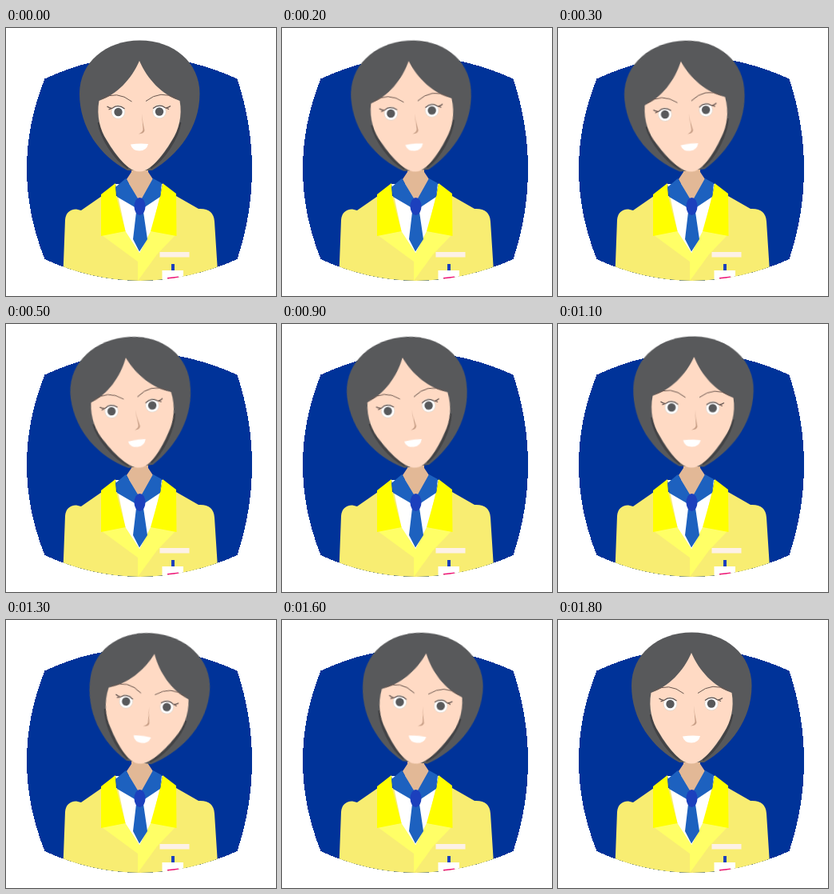
An HTML page that plays this animation: 338 px wide and 335 px high, repeating every 2.6 s.

```html
<!DOCTYPE html>
<html lang="en">
<head>
<meta charset="utf-8">
<title>Nodding assistant</title>
<style>
  html, body { margin: 0; width: 100%; height: 100%; overflow: hidden; background: #fff; }
  svg { display: block; width: 338px; height: 335px; }

  /* 26 beats of 100 ms */
  #head { transform-origin: 167px 170px; animation: tilt 2600ms step-end infinite; }
  @keyframes tilt {
    0%      { transform: rotate(0deg); }
    3.846%  { transform: rotate(-1.5deg); }
    7.692%  { transform: rotate(-3.75deg); }
    11.538% { transform: rotate(-5.9deg); }
    15.384% { transform: rotate(-7.2deg); }
    19.23%  { transform: rotate(-7.6deg); }
    34.615% { transform: rotate(-7.2deg); }
    38.461% { transform: rotate(-3.5deg); }
    42.307% { transform: rotate(1.5deg); }
    46.153% { transform: rotate(5.7deg); }
    50%     { transform: rotate(8.4deg); }
    53.846% { transform: rotate(9.4deg); }
    57.692% { transform: rotate(8.9deg); }
    61.538% { transform: rotate(6deg); }
    65.384% { transform: rotate(2deg); }
    69.23%  { transform: rotate(0deg); }
    100%    { transform: rotate(0deg); }
  }
</style>
</head>
<body>
<svg viewBox="0 0 338 335">
  <defs>
    <path id="badge" d="M48.5 63.500Q167 8 289.500 63.500Q326.500 176 289.500 289Q167 343 48.500 289Q3.500 176 48.500 63.500Z" shape-rendering="crispEdges"/>
    <clipPath id="inside"><use href="#badge"/></clipPath>
    <g id="eye">
      <circle r="8.800" fill="#e3d5c9"/>
      <circle r="8" fill="#fff"/>
      <circle r="5.200" fill="#58595b"/>
      <path d="M-14-7Q-10-4-7-5Q0-10 8-4M-12-3L-7-5" fill="none" stroke="#5d4f4b" stroke-width="1.200"/>
      <path d="M-21-16Q-2-28 17-13" fill="none" stroke="#6b5850"/>
    </g>
  </defs>

  <use href="#badge" fill="#039"/>

  <g id="body" clip-path="url(#inside)">
    <path fill="#f8ed72" d="M71 320L74 240Q75 227 88 226.500L94 228L120 210H213L241 226Q260 225 261 242L266 320Z"/>
    <path fill="#fff" d="M137 195H196L182 256L167 282L150 256Z"/>
    <path fill="#ff6" d="M120 259L149.500 254L167 281L165 292ZM181 254L212 259L189 283L165 316V286Z"/>
    <path fill="#ff0" d="M137 194L119 208V260L149.500 254L138 211ZM196 194L213 207L213.500 260L181 254L193 211Z"/>
    <path fill="#e2b896" d="M157 168H178V180L184 189L171 214H164L151 189L157 180Z"/>
    <path fill="#1d61bf" d="M150 188L137 199L139 211L163 225L165 213ZM184 188L195 194L193 211L172 225L170 213ZM163 230H172L177 264L167 279.500L159 264Z"/>
    <ellipse cx="167.500" cy="223" rx="7" ry="11" fill="#1c40bd"/>
    <path fill="#fdf1e6" d="M192.500 280H229.500V286.500H192.500Z"/>
    <path fill="#fff" d="M195.500 303H222V320H195.500Z"/>
    <path fill="#1c40bd" d="M207 295H211V303H207Z"/>
    <path fill="#f0147a" d="M202 312L216 310.500V313.500H202Z"/>
  </g>

  <g id="head">
    <path fill="#58595b" d="M167.500 15.500C210 15.500 242.500 43 242.500 82C242.500 125 215 159 183 178H152C118 160 92 125 92 82C92 43 125 15.500 167.500 15.500Z"/>
    <path fill="none" stroke="#434345" stroke-width="3" d="M116 118C119 137 136 164 153 175M218 118C215 137 198 164 181 175"/>
    <path fill="#ffdac4" d="M167 41C157 64 139 83 116.500 91C113 110 118 128 126 140C135 155 148 173 160 178Q167 181 174 178C186 173 199 155 208 140C216 128 221 110 217.500 91C195 83 177 64 167 41Z"/>
    <use href="#eye" transform="translate(140.500 105)"/>
    <use href="#eye" transform="translate(192 104.500) scale(-1 1)"/>
    <path fill="#c9a088" d="M170 107Q171 118 173.500 128Q173 132 166 132.500Q171 130 171.500 127Z"/>
    <path fill="#fff" d="M156 145.500Q167 144 178 145Q176 153.500 167 153.500Q158 153.500 156 145.500Z"/>
  </g>
</svg>
</body>
</html>
```
